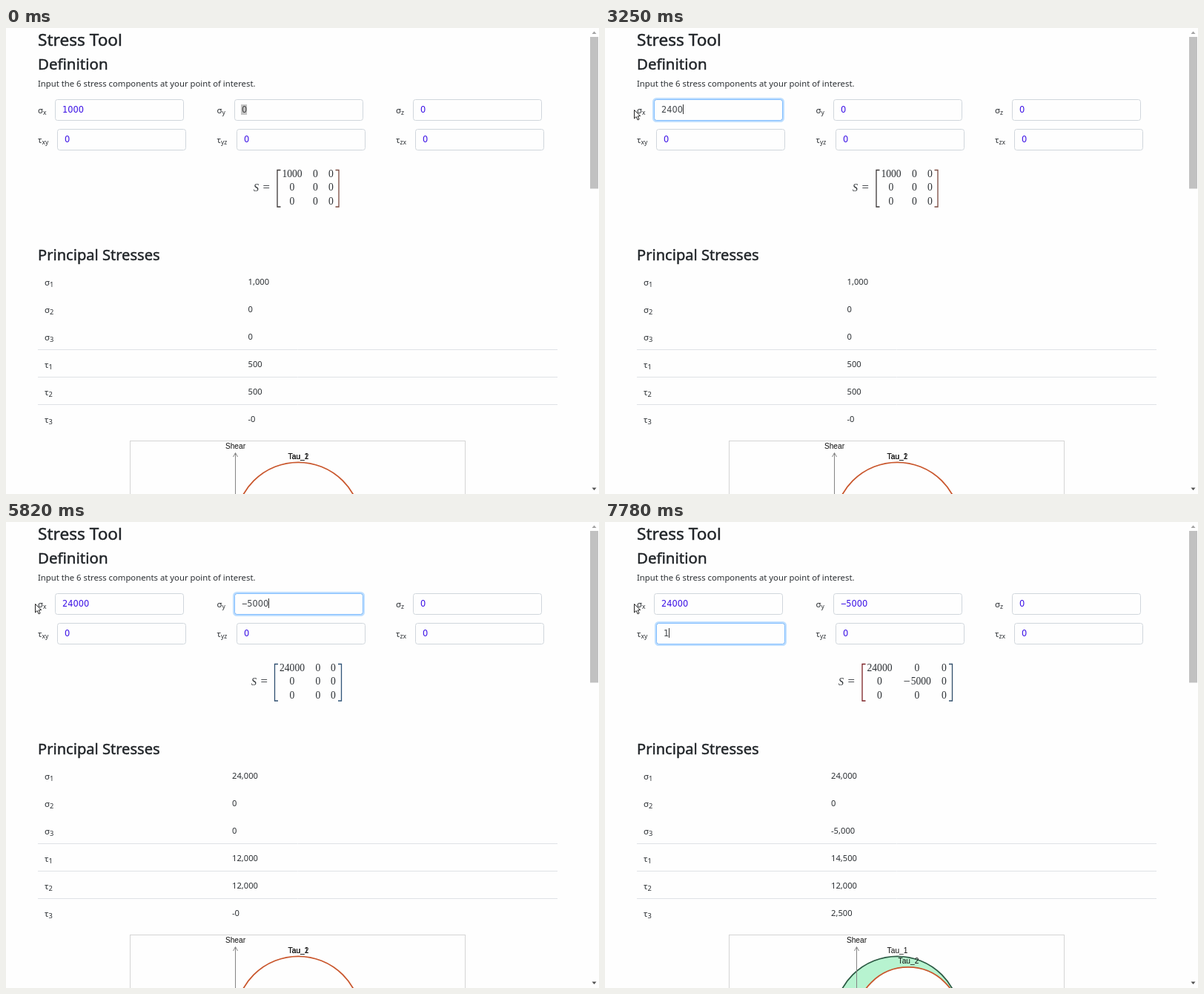
Recreate the animation shown at these times as an HTML page with a canvas. Size 800 by 628 pixels, loop 8 s.

```html
<!DOCTYPE html>
<html lang="en">
<head>
<meta charset="utf-8">
<title>Stress Tool</title>
<style>
html, body { margin: 0; width: 100%; height: 100%; overflow: hidden; background: #fefefe; }
canvas { display: block; width: 800px; height: 628px; }
</style>
</head>
<body>
<canvas id="stage" width="800" height="628"></canvas>
<script>
const g = document.getElementById('stage').getContext('2d');
const LOOP = 8000;
const SANS = '"Noto Sans", "Open Sans", sans-serif';
const WIDE = '"DejaVu Sans", sans-serif';
const MONO = '"DejaVu Sans Mono", monospace';
const SERIF = '"Liberation Serif", serif';
const ARIAL = '"Liberation Sans", sans-serif';
const INK = '#2b2f33', BLUE = '#3c12e6', CELL = 7.25;

const fields = [
  { sym: 'σ', sub: 'x', label: 43, x: 66, y: 96 },
  { sym: 'σ', sub: 'y', label: 284.5, x: 308, y: 96 },
  { sym: 'σ', sub: 'z', label: 526, x: 549, y: 96 },
  { sym: 'τ', sub: 'xy', label: 43, x: 69, y: 136 },
  { sym: 'τ', sub: 'yz', label: 284.5, x: 311, y: 136 },
  { sym: 'τ', sub: 'zx', label: 526, x: 552, y: 136 }
];
const focus = [[0, -1], [1770, 0], [4260, 1], [6840, 2], [7150, 3]];
const typing = [
  [[0, '1000'], [2940, '2'], [3020, '24'], [3100, '240'], [3250, '2400'], [3400, '24000']],
  [[0, '0'], [4960, '−'], [5420, '−5'], [5500, '−50'], [5650, '−500'], [5820, '−5000']],
  [[0, '0']],
  [[0, '0'], [7780, '1']],
  [[0, '0']],
  [[0, '0']]
];
const recalc = [3950, 6370];

// Matrix layouts: S position, bracket positions, column centres, bracket colours
const layouts = [
  [0, { s: 334, l: 366, r: 449, cols: [386, 417.5, 438.5], ink: ['#3d3838', '#7b4b41'] }],
  [3950, { loose: true, s: 341, l: 367, r: 443, cols: [386, 416, 434], ink: ['#24507a', '#1c3c50'] }],
  [4030, { s: 331, l: 362.5, r: 452.5, cols: [386, 421, 441.5], ink: ['#2f4f70', '#2f5478'] }],
  [6370, { loose: true, s: 328, l: 353, r: 457.5, cols: [372.5, 416, 447], ink: ['#2468a4', '#a0661c'] }],
  [6440, { s: 315, l: 347, r: 468.5, cols: [370.5, 421, 457.5], ink: ['#7c2226', '#33506c'] }]
];

const at = (list, t) => list.reduce((v, [time, item]) => time <= t ? item : v, list[0][1]);
const lerp = (a, b, k) => a + (b - a) * k;

function text(str, x, y, size, color = INK, font = SANS, align = 'left', style = '') {
  g.font = `${style} ${size}px ${font}`;
  g.textAlign = align;
  g.fillStyle = color;
  g.fillText(str, x, y);
}

function heading(str, y, size) {
  text(str, 43, y, size, '#212529');
  g.strokeStyle = '#212529';
  g.lineWidth = 0.45;
  g.strokeText(str, 43, y);
}

function path(points, color, width) {
  g.beginPath();
  points.forEach(([x, y]) => g.lineTo(x, y));
  g.strokeStyle = color;
  g.lineWidth = width;
  g.stroke();
}

function roundBox(x, y, w, h, r, color, width) {
  g.beginPath();
  g.roundRect(x, y, w, h, r);
  g.strokeStyle = color;
  g.lineWidth = width;
  g.stroke();
}

function symbol(sym, sub, x, y, size) {
  text(sym, x, y, 11.3);
  text(sub, x + g.measureText(sym).width, y + 2, size);
}

function value(str, x, y, color) {
  if (str[0] === '−') {
    text('−', x, y, 12, color, MONO);
    str = str.slice(1);
    x += CELL;
  }
  text(str, x, y, 11.4, color, WIDE);
}

function selection(str, x, y, from, to, fill, color) {
  g.save();
  g.beginPath();
  g.rect(from, y - 10.5, to - from, 14);
  g.clip();
  g.fillStyle = fill;
  g.fill();
  value(str, x, y, color);
  g.restore();
}

function ring(i, t) {
  const k = focus.findIndex(f => f[1] === i);
  if (k < 0) return 0;
  const step = time => Math.max(0, Math.min(1, (Math.floor((t - time) / 75) + 1) / 2));
  return step(focus[k][0]) - (focus[k + 1] ? step(focus[k + 1][0]) : 0);
}

function drawField(f, i, t) {
  const { x, y } = f, active = at(focus, t) === i;
  const str = at(typing[i], t), tx = x + 10, ty = y + 17.5;
  const glow = ring(i, t);
  symbol(f.sym, f.sub, f.label, y + 19.3, 8.5);
  roundBox(x + 0.5, y + 0.5, 173, 28, 3, '#d0d6dc', 1);
  if (glow > 0) {
    g.globalAlpha = glow;
    roundBox(x - 0.7, y - 0.7, 175.4, 30.4, 4, '#bfdfff', 2.6);
    roundBox(x + 0.5, y + 0.5, 173, 28, 3, '#80bdff', 1);
    g.globalAlpha = 1;
  }
  value(str, tx, ty, active ? '#44484c' : BLUE);

  if (i === 1 && t < 1770) selection(str, tx, ty, tx - 1, tx + CELL, '#c4c4c4', '#444');
  if (!active) return;
  const end = tx + str.length * CELL;
  const edits = typing[i], typed = edits.length > 1 && t >= edits[1][0];
  if (!typed) {
    const from = i === 0 ? Math.max(tx, Math.min(end, pointer(t).x)) : tx - 0.5;
    selection(str, tx, ty, from, end + 0.3, '#3390ff', '#fff');
  } else if (!recalc.some((r, k) => k === i && t >= r)) {
    g.fillStyle = '#333';
    g.fillRect(Math.round(end), ty - 10.5, 1, 13);
  }
}

function pointer(t) {
  if (t < 380) return null;
  if (t < 450) return { x: 691, y: 547 };
  if (t < 530) return { x: 511, y: 310 };
  if (t < 1770) {
    const n = t < 850 ? 0 : Math.min(10, Math.floor((t - 850) / 76.5) + 1) / 10;
    const k = n * n * (3 - 2 * n);
    const x = lerp(392, 112, k), y = lerp(242, 110, k);
    const over = fields.some(f => x > f.x && x < f.x + 174 && y > f.y && y < f.y + 29);
    return { x, y, beam: over };
  }
  const x = at([[1770, 108], [1850, 98], [1930, 84], [2000, 62], [2080, 34], [2160, 39]], t);
  return { x, y: 110, beam: t < 2160 };
}

function drawPointer(p) {
  if (!p) return;
  g.save();
  g.translate(Math.round(p.x) + 0.5, Math.round(p.y) + 0.5);
  if (p.beam) {
    path([[-3, -6], [3, -6]], '#222', 1);
    path([[0, -6], [0, 6]], '#222', 1);
    path([[-3, 6], [3, 6]], '#222', 1);
  } else {
    g.beginPath();
    [[0, 0], [0, 11.5], [2.7, 9], [4.6, 13.4], [6.6, 12.5], [4.7, 8.3], [8.2, 8]]
      .forEach(([x, y]) => g.lineTo(x, y));
    g.closePath();
    g.fillStyle = '#fff';
    g.fill();
    g.strokeStyle = '#222';
    g.lineWidth = 1;
    g.stroke();
  }
  g.restore();
}

function drawMatrix(m, sx, sy) {
  const size = m.loose ? 12 : 13.6, base = m.loose ? 212 : 200.5;
  const top = m.loose ? 205.5 : 191.5, bottom = m.loose ? 255 : 241;
  const tick = m.loose ? 3 : 4.5, width = m.loose ? 1.8 : 1.3;
  const mid = base + 19;
  text('S', m.s, mid + (m.loose ? 1 : 0), size + 0.4, INK, SERIF, 'left', 'italic');
  text('=', m.s + (m.loose ? 9 : 12.5), mid + 0.6, size + 3.2, INK, SERIF);
  [[m.l, tick], [m.r, -tick]].forEach(([x, d], i) =>
    path([[x + d, top], [x, top], [x, bottom], [x + d, bottom]], m.ink[i], width));
  for (let row = 0; row < 3; row++) {
    for (let col = 0; col < 3; col++) {
      const str = row !== col || row === 2 ? '0' : row ? sy : sx;
      const x = m.cols[col], y = base + row * 18.9;
      if (str[0] === '−') {
        text('−', x - (m.loose ? 12.5 : 14), y + 0.5, size + 2.6, INK, SERIF, 'center');
        text(str.slice(1), x + (m.loose ? 4.3 : 5.3), y, size, INK, SERIF, 'center');
      } else text(str, x, y, size, INK, SERIF, 'center');
    }
  }
}

function circle(x, r, color, fill) {
  g.beginPath();
  g.arc(x, 670.3, r, 0, Math.PI * 2);
  if (fill) {
    g.fillStyle = fill;
    g.fill();
  }
  g.strokeStyle = color;
  g.lineWidth = 1.8;
  g.stroke();
}

function drawPlot(high, low) {
  const scale = 170 / (high - low), zero = 309.3 - low * scale;
  const r = high * scale / 2, mid = zero + r;
  g.strokeStyle = '#d4d4d4';
  g.lineWidth = 1;
  g.strokeRect(167.5, 556.5, 452, 300);
  if (low < 0) {
    circle(394.3, 85, '#2c5a44', '#b7f3d0');
    circle(mid, r, '#c9562c', '#fefefe');
  } else circle(394.3, 85, '#c9562c');
  const ax = Math.round(zero) + 0.5;
  path([[ax, 573], [ax, 700]], '#858585', 1);
  path([[ax - 3, 578], [ax, 572.5], [ax + 3, 578]], '#858585', 1);
  text('Shear', ax, 567, 10.2, '#111', ARIAL, 'center');
  text('Tau_1', 394.5, 580.5, 10.2, '#111', ARIAL, 'center');
  text('Tau_2', low < 0 ? mid + 0.5 : 394.5, 580.5 + 85 - r, 10.2, '#111', ARIAL, 'center');
}

function drawResults(t, loose) {
  const high = t < 3950 ? 1000 : 24000, low = t < 6370 ? 0 : -5000;
  const rows = [high, 0, low, (high - low) / 2, high / 2, -low / 2];
  g.save();
  if (loose) g.translate(0, 16);
  heading('Principal Stresses', 313, 20.1);
  rows.forEach((v, i) => {
    const y = 346 + i * 37;
    if (loose || i > 2) path([[43, y - 23.5], [744, y - 23.5]], i ? '#dfe2e6' : '#eceef0', 1);
    symbol(i < 3 ? 'σ' : 'τ', i % 3 + 1, 52, y + 0.5, 9.3);
    text(v.toLocaleString('en-US'), t < 3950 ? 326.5 : 305, y, 11.2);
  });
  drawPlot(high, low);
  g.restore();
}

function triangle(y, d, color) {
  g.beginPath();
  g.moveTo(790.5, y);
  g.lineTo(796.5, y);
  g.lineTo(793.5, y + d);
  g.fillStyle = color;
  g.fill();
}

function draw(t) {
  const m = at(layouts, t);
  g.fillStyle = '#fefefe';
  g.fillRect(0, 0, 800, 628);

  heading('Stress Tool', 24, 22.6);
  heading('Definition', 55.5, 20.5);
  text('Input the 6 stress components at your point of interest.', 43, 79, 11.3);
  fields.forEach((f, i) => drawField(f, i, t));
  drawMatrix(m, t < 3950 ? '1000' : '24000', t < 6370 ? '0' : '−5000');
  drawResults(t, m.loose);

  g.fillStyle = '#c1c1c1';
  g.fillRect(788, 12, 11, m.loose ? 203 : 204.5);
  triangle(8, -3.5, '#a3a3a3');
  triangle(619.5, 3.5, '#505050');

  if (recalc.some(r => t >= r && t < r + 690)) {
    g.fillStyle = '#e6e6e6';
    g.fillRect(10, 595, 112, 19);
    g.strokeStyle = '#a8a8a8';
    g.lineWidth = 1;
    g.strokeRect(10.5, 595.5, 111, 18);
    text('Processing math: 100%', 16, 608.3, 9.1, '#111');
  }
  drawPointer(pointer(t));
}

const start = performance.now();
function frame() {
  draw((performance.now() - start) % LOOP);
  requestAnimationFrame(frame);
}
frame();
</script>
</body>
</html>
```
